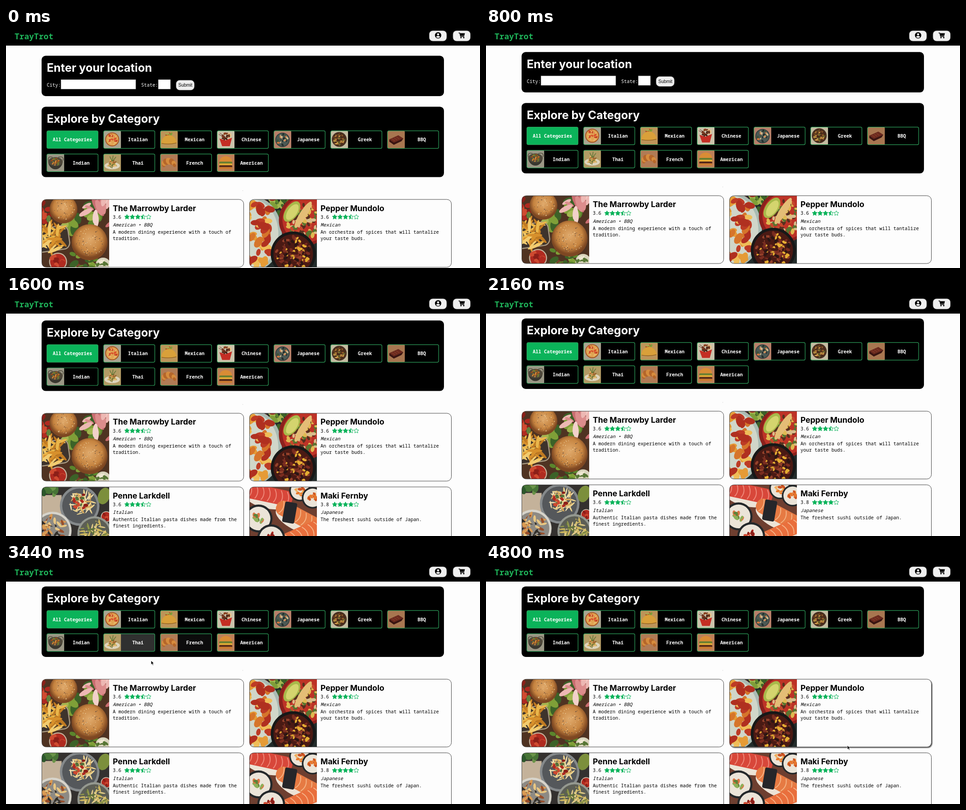
Animation, 1052 px wide and 532 px high, one loop 4880 ms. Source, as an HTML page:

```html
<!DOCTYPE html>
<html lang="en">
<head>
<meta charset="utf-8">
<title>Food ordering</title>
<style>
  html, body { margin: 0; width: 100%; height: 100%; overflow: hidden; background: #fdfdfd; }
  svg { display: block; width: 1052px; height: 532px; }
  text { font: 500 10.43px "Noto Sans Mono", "DejaVu Sans Mono", monospace; white-space: pre; }
  .light { fill: #fff; }
  .label { fill: #fff; font-weight: 600; text-anchor: middle; }
  .heading { fill: #fff; font: 700 25.3px Inter, sans-serif; }
  .title { font: 700 17.6px Inter, sans-serif; }
  .kind { font-style: italic; }
  .logo { fill: #1fb45a; font-size: 17.9px; font-weight: 700; }
  .submit { font: 10px "Liberation Sans", Arial, sans-serif; }
</style>
</head>
<body>
<svg id="stage" viewBox="0 0 1052 532"></svg>
<script>
const LOOP = 4880, STEP = 80, GREEN = '#0bb35a', PAPER = '#fdfdfd';

// Drawing helpers
const attrs = o => Object.entries(o).map(([k, v]) => `${k}="${v}"`).join(' ');
const box = (x, y, width, height, fill, rx = 0, more = {}) =>
  `<rect ${attrs({ x, y, width, height, fill, rx, ...more })}/>`;
const oval = (cx, cy, rx, ry, fill, turn = 0) =>
  `<ellipse ${attrs({ cx, cy, rx, ry, fill, transform: `rotate(${turn} ${cx} ${cy})` })}/>`;
const disc = (x, y, r, fill) => oval(x, y, r, r, fill);
const path = (d, fill, more = {}) => `<path ${attrs({ d, fill, ...more })}/>`;
const line = (d, stroke, width) => path(d, 'none', { stroke, 'stroke-width': width, 'stroke-linecap': 'round' });
const text = (x, y, s, kind = '') => `<text x="${x}" y="${y}" class="${kind}">${s}</text>`;
const group = (x, y, inner, turn = 0) => `<g transform="translate(${x} ${y}) rotate(${turn})">${inner}</g>`;
const repeat = (n, draw) => Array.from({ length: n }, (_, i) => draw(i)).join('');

let seed = 7;
const random = () => (seed = (seed * 16807) % 2147483647) / 2147483647;

// Grains strewn over a disc; their number follows from the area to cover.
function pile(x, y, r, grain, colors, slim = .6, cover = 1.2) {
  const list = colors.split(' ');
  return repeat(Math.round(cover * r * r / (grain * grain * slim)), i => {
    const a = random() * 2 * Math.PI, d = r * Math.sqrt(random()), size = grain * (.7 + random() * .6);
    return oval((x + d * Math.cos(a)).toFixed(1), (y + d * Math.sin(a)).toFixed(1),
      size.toFixed(1), (size * slim).toFixed(1), list[i % list.length], Math.round(random() * 180));
  });
}

const bowl = (x, y, r, rim, colors, grain, slim) =>
  disc(x, y, r, rim) + disc(x, y, r * .88, colors.split(' ')[0]) + pile(x, y, r * .75, grain, colors, slim);

const bun = (x, y, r) => disc(x, y, r, 'url(#crust)') + pile(x, y, r * .8, .9, '#f1d9a8 #5d4a40', .7, .04);

const roll = (x, y, r, colors) => disc(x, y, r, '#24282a') + disc(x, y, r * .85, '#ebe4d8') + pile(x, y, r * .4, r / 6, colors);

const nigiri = (x, y, turn, fish, vein) => group(x, y, oval(0, 10, 50, 20, '#ece3d6') + box(-54, -18, 108, 34, fish, 16) +
  repeat(7, i => line(`M${i * 14 - 44} -15q10 14 2 28`, vein, 2)), turn);

const leaves = '#7f9f38 #5b852c #a3b550 #3c6228';
const reds = '#b02a20 #cf4a30 #8c1f18';
const grill = '#4a2a1a #b98238 #7a4a22 #d9a650 #5f652d';

// Category pictures: background and drawing on a 38 px square
const foods = {
  Italian: ['#aaa591', () => bowl(19, 19, 15.5, '#a4521f', '#e0a352 #c63a23 #d9512c #e5b565', 2.6)],
  Mexican: ['#bd9459', () => pile(20, 15, 9, 3, leaves + ' #b94b27') +
    path('M2 28A17 18 0 0 1 36 27Q20 32 2 28Z', '#d9a03a') + line('M3 28Q20 31 35 27', '#8b5d20', 1.3)],
  Chinese: ['#cbc3ab', () => disc(26, 10, 6, '#e4c18d') + path('M5 17L19 21L33 15L28 34H11Z', '#c42e24') +
    pile(19, 14, 9, 2.6, '#6b3019 #8c4422 #432116') + line('M6 5L18 14M4 8L16 15', '#5f2b21', 1)],
  Japanese: ['#b88069', () => bowl(19, 20, 16, '#36423f', '#4d5a55 #d3783f #3c5134 #ccb48b #242e2e', 2.8)],
  Greek: ['#c5bca1', () => bowl(19, 19, 16.5, '#4a3426', grill, 2.6, .4)],
  BBQ: ['#a87650', () => path('M4 19L24 10L35 17L31 23L14 31L4 24Z', '#3a1512') +
    path('M4 19L24 10L35 17L14 26Z', '#6b2a1e') + repeat(3, i => line(`M${10 + i * 5} ${18 - i * 2}l6 4`, '#96452f', 1))],
  Indian: ['#9b9785', () => line('M3 14Q2 4 12 7M26 7Q38 4 36 14', '#4c4538', 1.4) + path('M3 16A16 18 0 0 0 35 16Z', '#39372f') +
    oval(19, 17, 16, 10, '#50493b') + group(0, 8, pile(19, 9, 9, 2.4, '#b76d27 #d58a39 #8c4c1e #6f7c31'))],
  Thai: ['#b39b65', () => oval(19, 26, 17, 8, '#ded5bd') + pile(19, 22, 8, 4, '#d9a34e #985523 #e0b566 #667336', .25, 2) +
    line('M19 16L14 6M19 16L21 4M20 16L27 7', '#62793b', 1.6)],
  French: ['#b17b55', () => repeat(7, i => {
    const a = Math.PI * (1.05 - i / 5.5), size = 4 + 4 * Math.sin(Math.PI * i / 6);
    return oval(19 + 12 * Math.cos(a), 24 - 8 * Math.sin(a), size, size * .8, i % 2 ? '#d68c3e' : '#b5662a', 60);
  })],
  American: ['#bd8059', () => path('M5 17A14 12 0 0 1 33 17Z', '#d98c35') +
    ['#677e30', '#e4ac35', '#542819', '#cb7b31'].map((c, i) => box(4.5, 17 + i * 4, 29, 4.6, c, 2)).join('')]
};

// Card photos on a 150 px square
const photos = {
  burgers: () => box(0, 0, 150, 150, '#4f3322') + pile(0, 20, 32, 9, reds + ' #63803b') + pile(90, 42, 46, 13, leaves) +
    pile(130, 28, 34, 15, '#dc8d8c #edb8b3 #c96d70 #f2d1ca', .35) + bun(48, 22, 31) + pile(85, 138, 36, 9, leaves + ' #78402a') +
    box(-24, 62, 84, 52, '#3d332c', 14, { stroke: '#a99a82', 'stroke-width': 2.5, transform: 'rotate(-8 20 85)' }) +
    pile(24, 84, 29, 14, '#eab64b #d7902c #f2cc70 #c07a22', .2, 1.6) + bun(106, 95, 40) +
    bowl(36, 138, 20, '#c4b19b', reds, 7) + bowl(136, 146, 17, '#d9d4bc', '#d9d4bc #577634 #eee8d2', 4),

  nachos: () => box(0, 0, 150, 150, '#232c2b') + pile(70, 0, 36, 8, leaves + ' #9d3025') + oval(8, 76, 64, 82, '#a9bbb3') +
    oval(6, 76, 58, 76, '#d0d6c9') + [35, 78, 118].map(y => pile(18, y, 30, 11, '#e59b36 #d6752b #efbd58 #bd3b25 #b03020', .6)).join('') +
    disc(122, 46, 57, '#8c211d') + disc(124, 45, 51, '#bd3327') + pile(124, 50, 40, 6, '#57301f #5a7430 #c5482d #e0b951 #d9bd8c') +
    oval(119, 34, 34, 8, '#e4bd76', -58) + oval(94, 27, 26, 14, '#a8b94a', -55) + oval(95, 28, 20, 10, '#d4d46e', -55) +
    bowl(97, 121, 50, '#171818', '#4a1a14 #7a2d20 #2b1614 #e6ae32 #94412b', 4.5),

  pasta: () => box(0, 0, 150, 150, '#34312f') + box(0, 18, 44, 44, '#c4b29a') + pile(16, 14, 20, 10, '#477436 #2c572b #6a9349') +
    bowl(84, 42, 44, '#85898b', '#55585b') + pile(88, 36, 25, 9, '#ead28f #d5a85b #f1dfad', .18) + pile(86, 32, 17, 4, reds + ' #54713a', .7, .7) +
    oval(138, 20, 13, 19, '#7c8f3c', 20) + bowl(143, 66, 12, '#d5d0bc', reds, 5) +
    bowl(24, 97, 42, '#d7d4cb', '#8d8a84 #d99a52 #e9c782 #984f2c #33302b', 8, .35) +
    bowl(117, 103, 38, '#94988f', '#5c5e55 #d1b95f #93994a #e1cb86 #61733a', 8, .2),

  sushi: () => box(0, 0, 150, 150, '#6e3f30') + nigiri(42, 18, 12, '#d8473a', '#ef897a') +
    roll(112, 8, 24, '#e7782d #c95122 #efab55') + roll(140, 24, 24, '#e7782d #c95122') +
    nigiri(108, 66, 28, '#e67a43', '#f4b384') + box(76, 34, 27, 46, '#25262a', 4, { transform: 'rotate(10 90 55)' }) +
    roll(20, 70, 31, '#8db05a #dc7646 #5f8238') + nigiri(112, 108, -24, '#e96f3d', '#f5b286') + roll(48, 114, 31, reds)
};

const star = Array.from({ length: 10 }, (_, i) => {
  const a = i * Math.PI / 5, r = i % 2 ? 2.7 : 5.7;
  return `${(r * Math.sin(a)).toFixed(2)} ${(-r * Math.cos(a)).toFixed(2)}`;
}).join('L');
const stars = score => repeat(5, i => group(189 + i * 12, 39,
  path(`M${star}Z`, score - i >= 1 ? GREEN : 'none', { stroke: GREEN, 'stroke-linejoin': 'round' }) +
  (score - i === .5 ? path(`M${star}Z`, GREEN, { 'clip-path': 'url(#half)' }) : '')));

const cards = [
  ['burgers', 'The Marrowby Larder', '3.6', 'American • BBQ', 'A modern dining experience with a touch of', 'tradition.'],
  ['nachos', 'Pepper Mundolo', '3.6', 'Mexican', 'An orchestra of spices that will tantalize', 'your taste buds.'],
  ['pasta', 'Penne Larkdell', '3.6', 'Italian', 'Authentic Italian pasta dishes made from the', 'finest ingredients.'],
  ['sushi', 'Maki Fernby', '3.8', 'Japanese', 'The freshest sushi outside of Japan.', '']
].map((info, i) => ({ info, x: 79.5 + 461 * (i % 2), y: 380 + 163.3 * (i >> 1), w: 448, h: 150.3 }));

const cells = ['', ...Object.keys(foods)].map((name, i) =>
  ({ name, x: 90.7 + 126 * (i % 7), y: 227.9 + 51.4 * Math.floor(i / 7), w: 113.6, h: 39 }));

function drawCell({ name, x, y, w, h }) {
  const border = { stroke: '#2fa35d', 'stroke-width': 1.2 };
  if (!name) return group(x, y, box(0, 0, w, h, GREEN, 3, border) + text(w / 2, 23.6, 'All Categories', 'label'));
  const [tone, draw] = foods[name];
  return group(x, y, box(0, 0, w, h, '#000', 3, { class: 'cell' }) + box(0, 0, 38.4, h, tone, 2) + draw() +
    box(0, 0, w, h, 'none', 3, border) + text(76, 23.6, name, 'label'));
}

function drawCard({ info: [photo, title, score, kind, first, second], x, y, w, h }) {
  const left = 157.5;
  return group(x, y, box(2, 2, w, h, '#000', 10, { class: 'shadow', filter: 'url(#blur)' }) +
    box(0, 0, w, h, PAPER, 10) + `<g clip-path="url(#photo)">${photos[photo]()}</g>` +
    box(0, 0, w, h, 'none', 10, { stroke: '#444' }) +
    text(left, 25.5, title, 'title') + text(left, 42.7, score) + stars(Math.round(score * 2) / 2) +
    text(left, 60, kind, 'kind') + text(left, 76, first) + text(left, 90, second));
}

const button = (x, y, w, h) => box(x, y, w, h, '#efefef', 8, { stroke: '#777', 'stroke-width': .7 });
const input = (x, w) => box(x, 114.3, w, 21, '#fff', 0, { stroke: '#888', 'stroke-width': .6 });

const header = box(0, 0, 1052, 39, '#000') + text(19, 25, 'TrayTrot', 'logo') +
  button(939.3, 6, 38.7, 23) + button(992, 6, 38.7, 23) +
  disc(959, 16.3, 7, '#000') + disc(959, 14.1, 2.4, '#efefef') + path('M954.7 20.2Q955 17.5 959 17.5T963.3 20.2Q959 23.8 954.7 20.2Z', '#efefef') +
  line('M1005 11H1007L1009 19H1016.5', '#000', 1.4) + path('M1007 11.5H1018.5L1017 17.5H1008.5Z', '#000') +
  disc(1009.8, 21.5, 1.4, '#000') + disc(1016, 21.5, 1.4, '#000');

const content = box(79, 61.5, 893, 89.5, '#000', 9) + text(90.5, 97, 'Enter your location', 'heading') +
  text(90.5, 130, 'City:', 'light') + input(122, 166) + text(300, 130, 'State:', 'light') + input(338, 27) +
  button(377.5, 115.7, 40.5, 22) + text(382.5, 130.2, 'Submit', 'submit') +
  box(79, 174.4, 893, 156.2, '#000', 9) + text(90.5, 210, 'Explore by Category', 'heading') +
  cells.map(drawCell).join('') + box(525, 360, 1, 1, '#bbb') + cards.map(drawCard).join('');

const stage = document.getElementById('stage');
stage.innerHTML = `<defs>
  <clipPath id="photo"><path d="M10 0H149.5V150.3H10Q0 150.3 0 140.3V10Q0 0 10 0Z"/></clipPath>
  <clipPath id="half"><rect x="-7" y="-7" width="7" height="14"/></clipPath>
  <radialGradient id="crust" cy=".42"><stop stop-color="#e0aa6c"/><stop offset=".7" stop-color="#c68440"/><stop offset="1" stop-color="#7d4722"/></radialGradient>
  <filter id="blur"><feGaussianBlur stdDeviation="1.2"/></filter></defs>
  ${box(0, 0, 1052, 532, PAPER)}<g id="content">${content}</g>${header}
  <g id="cursor">${path('M0 0V9.2L2.2 7.2L3.7 10.6L5.3 9.9L3.8 6.7H6.6Z', '#000', { stroke: '#fff', 'stroke-width': .8 })}</g>`;

// Motion
const scrollAt = t => 124.7 * (1 - Math.exp(-((Math.max(0, t - 620) / 582) ** 2.287)));

const route = [
  { t: 2480, x: 838, y: 117 }, { t: 2720, x: 579, y: 130 }, { t: 3280, x: 272, y: 176 },
  { t: 3440, x: 322, y: 214 }, { t: 4800, x: 802, y: 402 }
];

function cursorAt(t) {
  if (t < route[0].t) return null;
  const i = Math.max(1, route.findIndex(p => p.t >= t)), a = route[i - 1], b = route[i];
  const p = (t - a.t) / (b.t - a.t);
  return { x: a.x + (b.x - a.x) * p, y: a.y + (b.y - a.y) * p };
}

// Hover strength at every step; it lags the pointer by one step and fades out.
function hoverLevels({ x, y, w, h }) {
  const levels = [0];
  for (let t = 0; t < LOOP; t += STEP) {
    const at = cursorAt(t), top = y - scrollAt(t), last = levels.at(-1);
    const inside = at && at.x >= x && at.x <= x + w && at.y >= top && at.y <= top + h;
    levels.push(inside ? last + (1 - last) * .7 : last * .5);
  }
  return levels;
}

const cellNodes = [...stage.querySelectorAll('.cell')];
const shadowNodes = [...stage.querySelectorAll('.shadow')];
const cellLevels = cells.slice(1).map(hoverLevels);
const cardLevels = cards.map(hoverLevels);
const page = document.getElementById('content');
const cursor = document.getElementById('cursor');

function render(now) {
  const step = Math.floor((now % LOOP) / STEP), at = cursorAt(step * STEP);
  page.setAttribute('transform', `translate(0 ${-scrollAt(step * STEP)})`);
  cursor.setAttribute('visibility', at ? 'visible' : 'hidden');
  if (at) cursor.setAttribute('transform', `translate(${at.x} ${at.y})`);
  cellNodes.forEach((node, i) => {
    const grey = Math.round(105 * cellLevels[i][step]);
    node.setAttribute('fill', `rgb(${grey},${grey},${grey})`);
  });
  shadowNodes.forEach((node, i) => node.setAttribute('opacity', .7 * cardLevels[i][step]));
}

const start = performance.now();
function tick() {
  render(performance.now() - start);
  requestAnimationFrame(tick);
}
tick();
</script>
</body>
</html>
```
